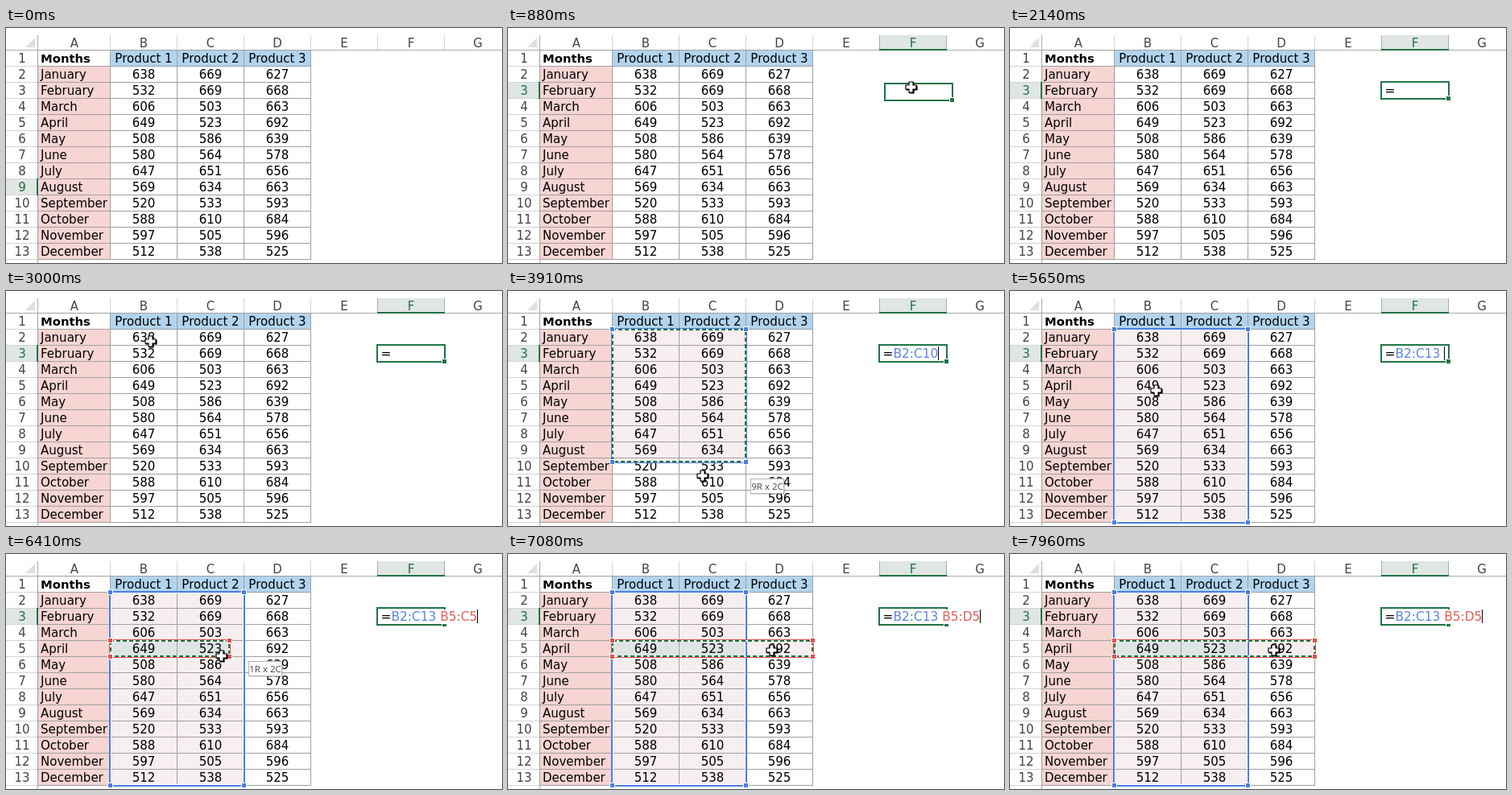
Animation of 616x292 px, one loop 7990 ms. Source, as an HTML page with a canvas:

```html
<!DOCTYPE html>
<html lang="en">
<head>
<meta charset="utf-8">
<title>Intersecting ranges in a spreadsheet</title>
<style>
  html, body { margin: 0; width: 100%; height: 100%; overflow: hidden; background: #fff; }
  canvas { display: block; width: 616px; height: 292px; }
</style>
</head>
<body>
<canvas></canvas>
<script>
const W = 616, H = 292, LOOP = 7990;
const FONT = '15px "DejaVu Sans", Verdana, sans-serif';
const BOLD = 'bold 14.8px "DejaVu Sans", Verdana, sans-serif';
const FORMULA_FONT = '15.4px "DejaVu Sans", Verdana, sans-serif';
const TIP_FONT = '11.5px "Open Sans", sans-serif';
const GREEN = '#217346', BLUE = '#4a7ee0', RED = '#e2504c';
const TINT = '#f7eeef', OVERLAP = '#dfe5e5', LIT = '#dfe6e3';
const GLIDE = 39, DELAY = 30, BLINK = 530;

const months = ['January', 'February', 'March', 'April', 'May', 'June', 'July',
  'August', 'September', 'October', 'November', 'December'];
const sales = [
  '638 532 606 649 508 580 647 569 520 588 597 512',
  '669 669 503 523 586 564 651 634 533 610 505 538',
  '627 668 663 692 639 578 656 663 593 684 596 525'
].map(list => list.split(' '));

// Pointer path: time, x, y
const path = [
  [0, 640, 148], [29, 640, 148], [30, 617, 144], [250, 545, 98], [380, 510, 78], [460, 501, 73],
  [900, 501, 73], [1280, 640, 140],
  [2340, 640, 158], [2370, 617, 157], [2700, 360, 110], [2920, 195, 66], [3000, 180, 62],
  [3400, 180, 62], [3600, 222, 100], [3910, 242, 229], [4130, 242, 270], [4200, 242, 275],
  [5050, 242, 275], [5500, 190, 140], [5700, 180, 118],
  [6265, 180, 118], [6323, 213, 121], [6410, 268, 126], [6500, 294, 131],
  [6650, 322, 134], [6860, 328, 119], [LOOP, 328, 119]
];

const drags = [
  { col: 1, row: 2, from: 3310, to: 4600, antsEnd: 5150, color: BLUE, ink: '#5b86e0' },
  { col: 1, row: 5, from: 5800, to: 6890, antsEnd: LOOP, color: RED, ink: '#e0605a' }
];
const SPACE_TYPED = 5150, EQUALS_TYPED = 2140, CLICKED = 720;

const canvas = document.querySelector('canvas');
const ctx = canvas.getContext('2d');
const scale = window.devicePixelRatio || 1;
canvas.width = W * scale;
canvas.height = H * scale;

const colX = col => col ? 47 + 83 * col : 40;
const rowY = row => 8 + 20 * row;
const colName = col => String.fromCharCode(65 + col);

function fill(color, x, y, w, h) {
  ctx.fillStyle = color;
  ctx.fillRect(x, y, w, h);
}

function text(str, x, y, color = '#000', align = 'left', font = FONT) {
  ctx.font = font;
  ctx.fillStyle = color;
  ctx.textAlign = align;
  ctx.fillText(str, x, y);
}

function handle(x, y, color) {
  fill('#fff', x - 3.5, y - 3.5, 7, 7);
  fill(color, x - 2.5, y - 2.5, 5, 5);
}

function pointerAt(t) {
  const i = Math.max(1, path.findIndex(p => p[0] >= t));
  const [t0, x0, y0] = path[i - 1], [t1, x1, y1] = path[i];
  const k = (t - t0) / (t1 - t0);
  return [x0 + (x1 - x0) * k, y0 + (y1 - y0) * k];
}

// Last cell of a dragged range; it follows the pointer with a short delay
function endCell(drag, t) {
  const [x, y] = pointerAt(Math.max(drag.from, Math.min(t, drag.to) - DELAY));
  return [
    Math.max(drag.col, Math.floor((x - 47) / 83)),
    Math.max(drag.row, Math.min(13, Math.floor((y - 8) / 20)))
  ];
}

const cornerOf = ([col, row]) => [colX(col + 1) - 1, rowY(row + 1) - 1];

// The drawn corner glides exponentially towards the corner of the end cell
function glidingCorner(drag, t) {
  const step = 5, ease = 1 - Math.exp(-step / GLIDE);
  let [x, y] = cornerOf([drag.col, drag.row]);
  for (let s = drag.from; s < Math.min(t, drag.to + 500); s += step) {
    const [tx, ty] = cornerOf(endCell(drag, s));
    x += (tx - x) * ease;
    y += (ty - y) * ease;
  }
  return [Math.round(x), Math.round(y)];
}

function rangeAt(drag, t) {
  const [right, bottom] = glidingCorner(drag, t), [col, row] = endCell(drag, t);
  const x = colX(drag.col), y = rowY(drag.row);
  const start = colName(drag.col) + drag.row;
  const single = col === drag.col && row === drag.row;
  return {
    drag, x, y, w: right - x, h: bottom - y, single,
    corner: cornerOf([col, row]),
    label: single ? start : `${start}:${colName(col)}${row}`,
    size: `${row - drag.row + 1}R x ${col - drag.col + 1}C`
  };
}

function drawSheet(t, ranges) {
  fill('#fff', 0, 0, W, H);
  const activeRow = t < CLICKED ? 9 : 3, activeCol = t < CLICKED ? -1 : 5;

  fill('#f6d5d3', 40, 48, 90, 240);
  fill('#b2d4ee', 130, 28, 249, 20);
  ranges.forEach(r => fill(TINT, r.x, r.y, r.w, r.h));
  if (ranges.length > 1) {
    const [a, b] = ranges;
    fill(OVERLAP, b.x, b.y, Math.min(b.x + b.w, a.x + a.w) - b.x, b.h);
  }

  fill(LIT, 0, rowY(activeRow), 39, 19);
  if (activeCol > 0) fill(LIT, colX(activeCol) - 1, 9, 83, 18);

  for (let col = 0; col < 8; col++) {
    const edge = col === activeCol || col === activeCol + 1;
    fill(edge && activeCol > 0 ? '#ababab' : '#d4d4d4', colX(col) - 1, 9, 1, 18);
    if (col < 7) {
      const mid = col ? colX(col) + 41 : 85;
      text(colName(col), mid, 24, col === activeCol ? GREEN : '#444', 'center');
    }
  }
  for (let row = 1; row < 14; row++) {
    fill('#d4d4d4', 0, rowY(row + 1) - 1, 39, 1);
    text(row, 20, rowY(row) + 15, row === activeRow ? GREEN : '#444', 'center');
  }
  ctx.fillStyle = '#dfdfdf';
  ctx.beginPath();
  ctx.moveTo(36, 12);
  ctx.lineTo(36, 24);
  ctx.lineTo(24, 24);
  ctx.fill();

  fill('#ababab', 0, 27, W, 1);
  fill('#ababab', 39, 9, 1, H - 9);
  for (let row = 1; row < 15; row++) fill('#a0a0a0', 39, rowY(row) - 1, 340, 1);
  for (let col = 0; col < 5; col++) fill('#a0a0a0', colX(col) - 1, 27, 1, 261);
  fill(GREEN, 38, rowY(activeRow) - 1, 2, 21);
  if (activeCol > 0) fill(GREEN, colX(activeCol) - 1, 26, 84, 2);

  text('Months', 43, 43, '#000', 'left', BOLD);
  months.forEach((name, i) => text(name, 43, rowY(i + 2) + 15));
  sales.forEach((list, i) => {
    const mid = colX(i + 1) + 41;
    text('Product ' + (i + 1), mid, 43, '#000', 'center');
    list.forEach((n, j) => text(n, mid, rowY(j + 2) + 15, '#000', 'center'));
  });
}

// Coloured frame outside, moving dashes or a thin white line just inside it
function drawRange({ x, y, w, h, drag }, t) {
  const outline = (color, grow, width = 2) => {
    ctx.strokeStyle = color;
    ctx.lineWidth = width;
    ctx.strokeRect(x - grow, y - grow, w + 2 * grow, h + 2 * grow);
  };
  outline(drag.color, 1);
  if (t < drag.antsEnd) {
    outline('#fff', 0);
    ctx.setLineDash([5, 3]);
    ctx.lineDashOffset = -Math.round((t - drag.from) * 0.025);
    outline(GREEN, 0);
    ctx.setLineDash([]);
  } else {
    outline('#fff', -.5, 1);
  }
  for (const hx of [x - .5, x + w + .5])
    for (const hy of [y - .5, y + h + .5]) handle(hx, hy, drag.color);
}

function drawTip(r, t) {
  if (r.single || t >= r.drag.to) return;
  const x = r.corner[0] + 6, y = r.corner[1] + 6;
  fill('rgba(0,0,0,.15)', x + 1, y + 1, 42, 19);
  fill('#fff', x, y, 42, 19);
  ctx.strokeStyle = '#b4b4b4';
  ctx.lineWidth = 1;
  ctx.strokeRect(x + .5, y + .5, 41, 18);
  text(r.size, x + 21, y + 14, '#444', 'center', TIP_FONT);
}

function caretShown(t) {
  if (t < drags[0].from) return false;
  if (drags.some(d => t >= d.from && t < d.to)) return true;
  const reset = [drags[0].to, SPACE_TYPED, drags[1].to].filter(s => s <= t).pop();
  return Math.floor((t - reset) / BLINK) % 2 === 0;
}

function drawActiveCell(t, ranges) {
  if (t < CLICKED) return;
  const left = Math.exp(-(t - CLICKED) / GLIDE);
  const x = Math.round(461 + 415 * left), y = Math.round(67 + 120 * left);
  ctx.strokeStyle = GREEN;
  ctx.lineWidth = 2;
  ctx.strokeRect(x, y, 84, 21);
  handle(x + 83.5, y + 20.5, GREEN);
  if (t < EQUALS_TYPED) return;

  if (ranges.length > 1) fill('#fff', 541, 69, 50, 18);
  let pen = 465.5;
  const write = (str, color) => {
    text(str, pen, 83, color, 'left', FORMULA_FONT);
    pen += ctx.measureText(str).width;
  };
  write('=');
  ranges.forEach((r, i) => {
    if (i) write(' ');
    write(r.label, r.drag.ink);
  });
  if (ranges.length === 1 && t >= SPACE_TYPED) write(' ');
  if (caretShown(t)) fill('#000', Math.floor(pen), 69, 1, 17);
}

function drawPointer(x, y) {
  const a = 6.5, b = 2.5;
  const cross = new Path2D();
  [[-b, -a], [b, -a], [b, -b], [a, -b], [a, b], [b, b],
   [b, a], [-b, a], [-b, b], [-a, b], [-a, -b], [-b, -b]]
    .forEach(([px, py]) => cross.lineTo(px, py));
  cross.closePath();
  ctx.save();
  ctx.lineWidth = 1.2;
  ctx.strokeStyle = ctx.fillStyle = '#000';
  ctx.translate(Math.round(x) + .5, Math.round(y) + 1.5);
  ctx.fill(cross);
  ctx.stroke(cross);
  ctx.translate(-1, -1);
  ctx.fillStyle = '#fff';
  ctx.fill(cross);
  ctx.stroke(cross);
  ctx.restore();
}

function draw(t) {
  ctx.setTransform(scale, 0, 0, scale, 0, 0);
  const ranges = drags.filter(d => t >= d.from).map(d => rangeAt(d, t));
  drawSheet(t, ranges);
  ranges.forEach(r => drawRange(r, t));
  drawActiveCell(t, ranges);
  ranges.forEach(r => drawTip(r, t));
  drawPointer(...pointerAt(t));
}

const begin = performance.now();
function tick() {
  draw((performance.now() - begin) % LOOP);
  requestAnimationFrame(tick);
}
tick();
</script>
</body>
</html>
```
